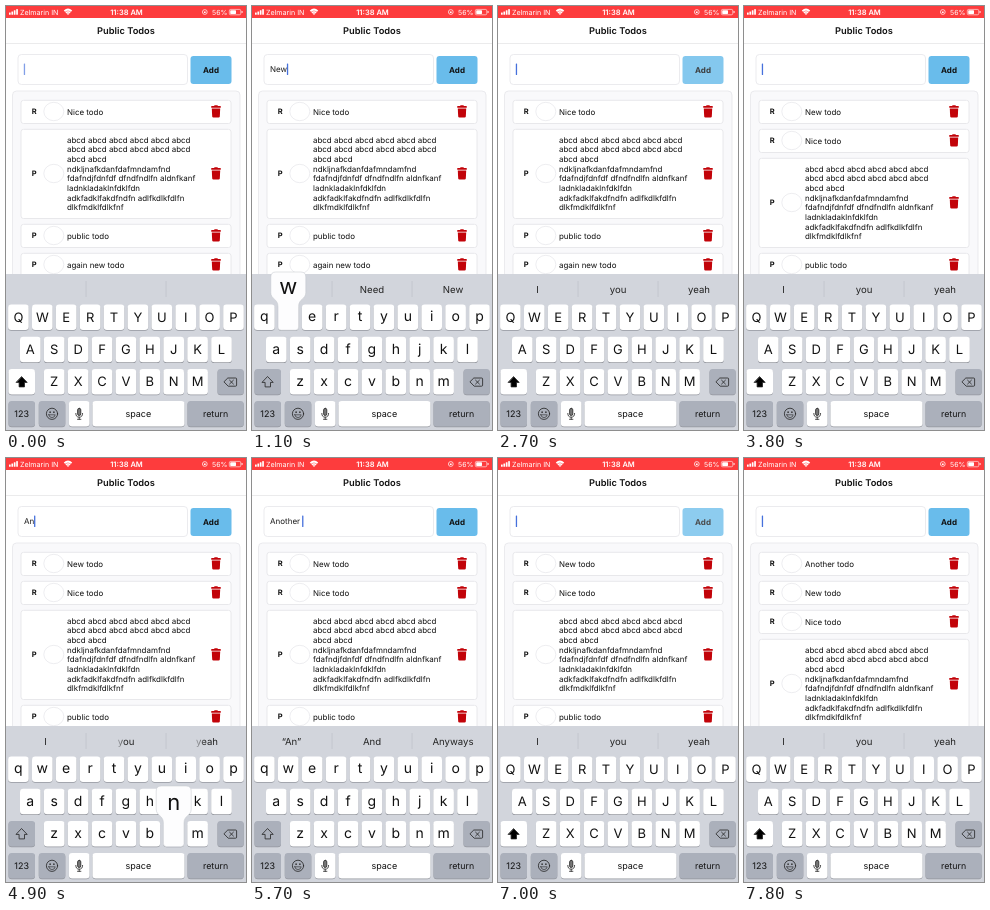
An HTML page that plays this animation: 240 px wide and 424 px high, repeating every 8000 ms.

```html
<!DOCTYPE html>
<html lang="en">
<head>
<meta charset="utf-8">
<title>Public Todos</title>
<style>
  html, body { margin: 0; width: 100%; height: 100%; overflow: hidden; background: #fff; }
  svg { display: block; width: 100%; height: 100%; }
  text {
    font-family: Inter, Roboto, "Liberation Sans", sans-serif;
    white-space: pre; text-rendering: geometricPrecision;
  }
</style>
</head>
<body>
<svg id="stage" viewBox="0 0 240 424" preserveAspectRatio="none"></svg>
<script>
const LOOP = 8000;
const NS = 'http://www.w3.org/2000/svg';
const stage = document.getElementById('stage');

function el(parent, tag, attrs = {}, content) {
  const node = document.createElementNS(NS, tag);
  for (const k in attrs) node.setAttribute(k, attrs[k]);
  if (content !== undefined) node.textContent = content;
  parent.appendChild(node);
  return node;
}
const group = (p, attrs) => el(p, 'g', attrs);
const box = (p, x, y, width, height, rx, attrs) => el(p, 'rect', { x, y, width, height, rx, ...attrs });
const path = (p, d, attrs) => el(p, 'path', { d, fill: 'none', ...attrs });
const label = (p, x, y, size, s, attrs) => el(p, 'text', { x, y, 'font-size': size, fill: '#111', ...attrs }, s);
const MID = { 'text-anchor': 'middle' };
const show = (node, on) => node.setAttribute('visibility', on ? 'visible' : 'hidden');
const clamp = v => Math.max(0, Math.min(1, v));

// Timeline: [character, finger down, finger up]
const taps = [
  ['N', 400, 600], ['e', 800, 900], ['w', 1000, 1100], [' ', 1200, 1300],
  ['t', 1400, 1500], ['o', 1600, 1700], ['d', 1800, 1890], ['o', 1900, 2000],
  ['A', 3900, 4100], ['n', 4700, 4880], ['o', 5000, 5080], ['t', 5150, 5230],
  ['h', 5280, 5360], ['e', 5400, 5480], ['r', 5520, 5600], [' ', 5640, 5690],
  ['t', 5800, 5870], ['o', 5900, 5980], ['d', 6010, 6090], ['o', 6120, 6200]
];
const HOLD = 60;
const clears = [2450, 6800];
const lower = [[700, 2450], [4150, 6800]];
const common = ['I', 'you', 'yeah'];
const hints = [
  [-300, ['', '', '']], [200, common], [1000, ['“Ne”', 'Need', 'New']], [2500, common],
  [5150, ['“An”', 'And', 'Anyways']], [6640, ['', '', '']], [7000, common]
];
const WIPE = 200;

// Page
box(stage, 0, 0, 240, 424, 0, { fill: '#fff' });
box(stage, 0, 0, 240, 12, 0, { fill: '#fd3c3d' });
const white = { fill: '#fff' };
[2.4, 3.4, 4.6, 5.8].forEach((h, i) => box(stage, 3 + i * 2.4, 8.8 - h, 1.7, h, 0.4, white));
label(stage, 14, 8.7, 7.1, 'Zelmarin IN', white);
path(stage, 'M57.8 4.4Q62 0.8 66.2 4.4L62 9Z', white);
path(stage, 'M59 6Q62 3.6 65 6M60.4 7.5Q62 6.2 63.6 7.5', { stroke: '#fd3c3d', 'stroke-width': 0.5 });
label(stage, 120.5, 8.8, 7.5, '11:38 AM', { ...white, ...MID, 'font-weight': 600 });
el(stage, 'circle', { cx: 198.8, cy: 6, r: 2.4, fill: 'none', stroke: '#fff', 'stroke-width': 0.7 });
box(stage, 197.9, 5.4, 1.8, 1.5, 0.3, white);
label(stage, 206, 8.7, 7, '56%', white);
box(stage, 223.3, 3.4, 11.5, 5.4, 1.4, { fill: 'none', stroke: '#fff', 'stroke-width': 0.6 });
box(stage, 224.2, 4.3, 5.8, 3.6, 0.6, white);
box(stage, 235.6, 5.1, 0.9, 2, 0.4, white);
label(stage, 120, 27.5, 9.3, 'Public Todos', { ...MID, 'font-weight': 600 });
box(stage, 0, 37, 240, 0.6, 0, { fill: '#dedee0' });

// Input and button
box(stage, 12, 48.5, 169.5, 30, 3.5, { fill: '#fff', stroke: '#e6e6ea', 'stroke-width': 0.8 });
const input = label(stage, 18, 66.2, 8, '', { fill: '#1c1c1c' });
const caret = box(stage, 18, 57.5, 1.3, 11.5, 0.5, { fill: '#4671dc' });
const button = group(stage);
box(button, 184.5, 50, 41, 28, 3, { fill: '#69bceb' });
label(button, 205, 66.6, 8, 'Add', { ...MID, 'font-weight': 700 });

// List
box(stage, 6.5, 85, 227.5, 400, 4, { fill: '#f9f9fb', stroke: '#e6e6ea', 'stroke-width': 0.8 });

function trash(p, cy) {
  const g = group(p, { transform: `translate(210 ${cy})`, fill: '#c20309' });
  box(g, -4.8, -5.4, 9.6, 1.6, 0.5);
  box(g, -1.8, -6.2, 3.6, 1.4, 0.5);
  path(g, 'M-4.2-3.1H4.2L3.8 5Q3.7 6.1 2.6 6.1H-2.6Q-3.7 6.1-3.8 5Z', { fill: '#c20309' });
}

function todo(tag, lines) {
  const g = group(stage);
  const h = lines.length > 1 ? 90 : 24;
  const cy = h / 2 - 0.5;
  box(g, 15, 0.3, 210, h - 0.8, 2.5, { fill: '#fff', stroke: '#e4e4e8', 'stroke-width': 0.8 });
  label(g, 28.3, cy + 2.8, 7.5, tag, { ...MID, 'font-weight': 700 });
  el(g, 'ellipse', { cx: 47.8, cy, rx: 10, ry: 9.2, fill: '#fff', stroke: '#e6e6ea', 'stroke-width': 0.7 });
  const first = cy + 3 - (lines.length - 1) * 4.82;
  lines.forEach((s, i) => label(g, 61, first + i * 9.64, 7.95, s));
  trash(g, cy);
  return { g, h };
}
const abcd = n => Array(n).fill('abcd').join(' ');
const todos = [
  [7300, todo('R', ['Another todo'])],
  [3100, todo('R', ['New todo'])],
  [0, todo('R', ['Nice todo'])],
  [0, todo('P', [abcd(6), abcd(6), abcd(2), 'ndkljnafkdanfdafmndamfnd',
    'fdafndjfdnfdf dfndfndlfn aldnfkanf', 'ladnkladaklnfdklfdn',
    'adkfadklfakdfndfn adlfkdlkfdlfn', 'dlkfmdklfdlkfnf'])],
  [0, todo('P', ['public todo'])],
  [0, todo('P', ['again new todo'])]
];

// Keyboard
const board = group(stage);
box(board, 0, 268, 240, 156, 0, { fill: '#d2d5dc' });
[80, 160].forEach(x => box(board, x - 0.3, 275, 0.7, 16, 0, { fill: '#bdc1c9' }));

const grad = el(el(stage, 'defs'), 'linearGradient', { id: 'wipe' });
const stops = [0, 1].map(() => el(grad, 'stop', { 'stop-color': '#222' }));
const slots = [39.5, 120, 201].map(x => label(board, x, 286.6, 9.6, '', { ...MID, fill: 'url(#wipe)' }));

function cap(x, y, w, fill) {
  box(board, x, y + 0.8, w, 25.5, 3.2, { fill: '#94979e' });
  return box(board, x, y, w, 25.5, 3.2, { fill });
}
const keys = {};
[['qwertyuiop', 12.4, 298.5], ['asdfghjkl', 24.3, 330.8], ['zxcvbnm', 48.2, 363]].forEach(([row, x0, y]) => {
  [...row].forEach((c, i) => {
    const cx = x0 + i * 23.9;
    cap(cx - 10.3, y, 20.6, '#fff');
    keys[c] = { cx, y, text: label(board, cx, y + 17, 13, c, MID) };
  });
});
const GREY = '#abb0bb';
const ink = { stroke: '#222', 'stroke-width': 0.8, 'stroke-linejoin': 'round', 'stroke-linecap': 'round' };
const shiftCap = cap(2.5, 363, 26.5, GREY);
const shiftIcon = path(board, 'M15.8 370.8L21.2 376.4H18.5V380.9H13.1V376.4H10.4Z', ink);
cap(211.5, 363, 26.2, GREY);
path(board, 'M222.2 372H229.6Q230.6 372 230.6 373V379.2Q230.6 380.2 229.6 380.2H222.2L218.2 376.1ZM223.6 374.2L227.4 378M227.4 374.2L223.6 378', ink);
cap(2.5, 395, 26.5, GREY);
label(board, 15.7, 411, 9, '123', MID);
cap(32.8, 395, 26.5, GREY);
el(board, 'circle', { cx: 46, cy: 407.8, r: 5.6, fill: 'none', ...ink });
[44.1, 47.9].forEach(cx => el(board, 'ellipse', { cx, cy: 406.2, rx: 0.7, ry: 0.9, fill: '#222' }));
path(board, 'M42.8 408.8H49.2Q48.8 411.6 46 411.6T42.8 408.8Z', { ...ink, 'stroke-width': 0.6 });
cap(62.9, 395, 20.6, '#fff');
box(board, 71.6, 402.3, 3.2, 7.2, 1.6, ink).setAttribute('fill', '#777');
path(board, 'M69.8 407.4Q69.8 411.2 73.2 411.2T76.6 407.4M73.2 411.2V413.3M71.5 413.3H74.9', ink);
cap(86.5, 395, 92, '#fff');
label(board, 132.3, 410.6, 9, 'space', MID);
cap(181.5, 395, 56.2, GREY);
label(board, 209.6, 410.6, 8.8, 'return', MID);

const bubble = group(stage);
const bubbleShape = path(bubble, '', { fill: '#fdfdfe', stroke: '#c0c4cb', 'stroke-width': 0.5 });
const bubbleText = label(bubble, 0, 0, 22, '', MID);

function drawBubble(t) {
  const tap = taps.filter(([c, a, b]) => c !== ' ' && t >= a && t < b + HOLD).pop();
  show(bubble, !!tap);
  if (!tap) return;
  const { cx, y } = keys[tap[0].toLowerCase()];
  const top = Math.max(y - 35, 266);
  bubbleShape.setAttribute('d',
    `M${cx - 17.5} ${top + 5}q0-5 5-5h25q5 0 5 5V${y - 12}` +
    `C${cx + 17.5} ${y - 5} ${cx + 10.3} ${y - 6} ${cx + 10.3} ${y + 2}V${y + 22.5}q0 3.2-3.2 3.2h-14.2q-3.2 0-3.2-3.2V${y + 2}` +
    `C${cx - 10.3} ${y - 6} ${cx - 17.5} ${y - 5} ${cx - 17.5} ${y - 12}Z`);
  bubbleText.setAttribute('x', cx);
  bubbleText.setAttribute('y', y - 11);
  bubbleText.textContent = tap[0];
}

function drawInput(t) {
  const cleared = clears.filter(c => c <= t).pop() ?? -950;
  const typed = taps.filter(k => k[2] <= t && k[2] > cleared);
  input.textContent = typed.map(k => k[0]).join('');
  caret.setAttribute('x', 17.8 + (typed.length ? input.getComputedTextLength() : 0));
  const last = typed.length ? typed[typed.length - 1][2] : cleared;
  const phase = (t - last) % 1000;
  caret.setAttribute('opacity', phase < 800 ? clamp((600 - phase) / 150) : clamp((phase - 850) / 150));
}

function drawButton(t) {
  const tap = clears.find(c => t >= c - 100 && t < c + 400);
  const d = tap === undefined ? 400 : t - tap;
  button.setAttribute('opacity', d < 0 ? 1 - 0.5 * (d + 100) / 100 : 0.5 + 0.5 * clamp(d / 400));
}

// Words wipe away from the left, then the next set fades in
function drawHints(t) {
  let i = hints.length - 1;
  while (t < hints[i][0] - WIPE / 2) i--;
  const next = hints[i + 1];
  slots.forEach((s, n) => { if (s.textContent !== hints[i][1][n]) s.textContent = hints[i][1][n]; });
  const enter = clamp((t - hints[i][0] + WIPE / 2) / (WIPE / 2));
  const leave = next ? clamp((t - next[0] + WIPE * 1.5) / WIPE) : 0;
  const p = leave || enter;
  stops[0].setAttribute('offset', clamp(p * 1.2 - 0.2));
  stops[1].setAttribute('offset', clamp(p * 1.2 + 0.1));
  stops[0].setAttribute('stop-opacity', leave ? clamp(1 - leave * 2.4) : 1);
  stops[1].setAttribute('stop-opacity', leave ? clamp((1 - leave) * 3) : enter);
}

function drawKeys(t) {
  const small = lower.some(([a, b]) => t >= a && t < b);
  for (const c in keys) {
    const { text, y } = keys[c];
    text.textContent = small ? c : c.toUpperCase();
    text.setAttribute('font-size', small ? 14 : 13);
    text.setAttribute('y', y + (small ? 16.9 : 17.3));
  }
  shiftCap.setAttribute('fill', small ? GREY : '#fff');
  shiftIcon.setAttribute('fill', small ? 'none' : '#000');
}

function drawList(t) {
  let y = 94;
  for (const [from, { g, h }] of todos) {
    show(g, t >= from);
    if (t < from) continue;
    g.setAttribute('transform', `translate(0 ${y})`);
    y += h + 5;
  }
}

const start = performance.now();
function frame(now) {
  const t = Math.max(0, now - start) % LOOP;
  drawList(t);
  drawInput(t);
  drawButton(t);
  drawHints(t);
  drawKeys(t);
  drawBubble(t);
  requestAnimationFrame(frame);
}
frame(start);
</script>
</body>
</html>
```
